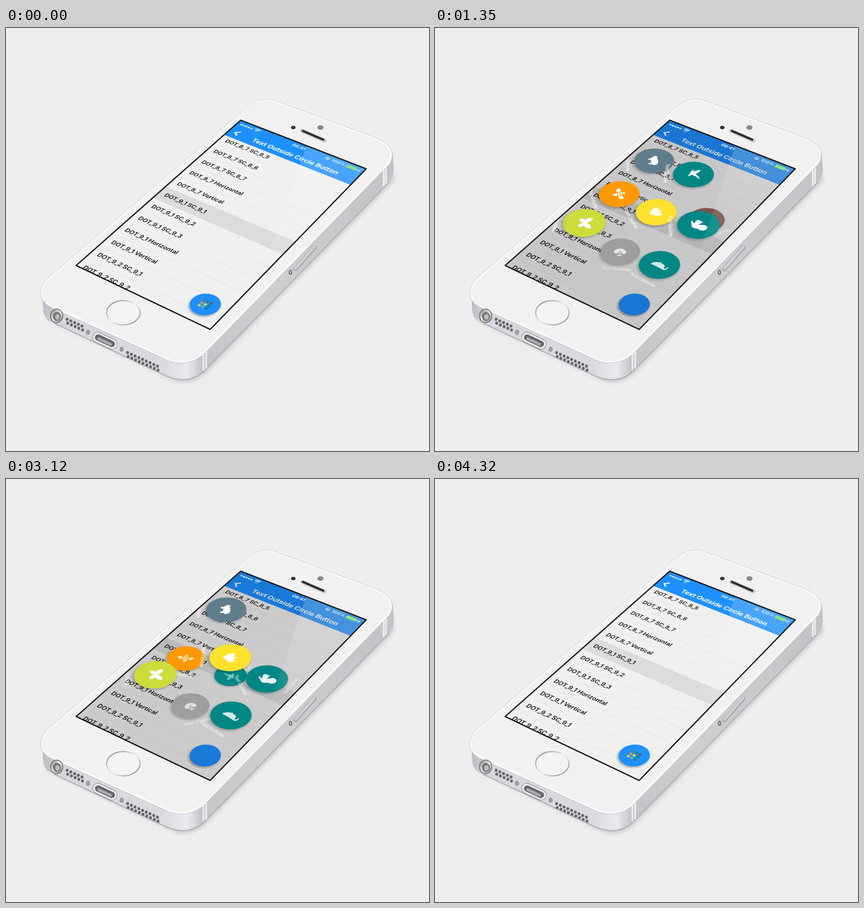
An HTML page that plays this animation: 748 by 748 pixels, repeating every 4350 ms.

```html
<!DOCTYPE html>
<html lang="en">
<head>
<meta charset="utf-8">
<title>Circle button menu</title>
<style>
html, body { margin: 0; width: 100%; height: 100%; overflow: hidden; background: #eee; }
svg { position: absolute; left: 0; top: 0; }
text { font-family: Inter, Roboto, sans-serif; }
/* Lays the flat 320 x 568 display onto the tilted phone. */
#screen {
  transform-origin: 0 0;
  transform: matrix3d(.5987, .2316, 0, -.00014925, -.53827, .36454, 0, -.00020933, 0, 0, 1, 0, 415, 163, 0, 1);
}
</style>
</head>
<body>
<svg id="phone" width="748" height="748">
  <defs>
    <linearGradient id="right" x1="0" y1="1" x2="1" y2="0">
      <stop offset="0" stop-color="#d2d2d6"/><stop offset=".1" stop-color="#bdbdc1"/>
      <stop offset=".5" stop-color="#cfcfd2"/><stop offset="1" stop-color="#c2c2c6"/>
    </linearGradient>
    <linearGradient id="base">
      <stop offset="0" stop-color="#bcbcc2"/><stop offset=".12" stop-color="#d6d6dc"/>
      <stop offset=".75" stop-color="#dadae0"/><stop offset=".9" stop-color="#e9e9ef"/>
      <stop offset="1" stop-color="#bebec4"/>
    </linearGradient>
    <linearGradient id="metal" x2="1" y2="1">
      <stop offset="0" stop-color="#777"/><stop offset=".5" stop-color="#eee"/><stop offset="1" stop-color="#777"/>
    </linearGradient>
    <filter id="soft"><feGaussianBlur stdDeviation="4"/></filter>
  </defs>
  <path d="M74 514L300 623Q330 630 354 607L684 270L686 256L340 580L80 490Z" fill="#999" opacity=".6" filter="url(#soft)"/>
  <path d="M64 466L66 500Q67 515 85 522L285 616Q326 632 353 604L677 273Q686 263 686 248L684 222L352 560L300 585Z" fill="url(#right)"/>
  <path d="M64 466L66 500Q67 515 85 522L285 616Q322 630 350 606L350 572L300 585Z" fill="url(#base)"/>
  <path d="M85 522L285 616Q326 632 353 604L677 273" fill="none" stroke="#aaaab0" stroke-width="1.5"/>
  <path d="M428 140Q444 124 470 127L655 196Q692 212 677 239L352 572Q328 597 292 588L80 492Q50 476 72 446Z" fill="#f1f1f1" stroke="#fafafa" stroke-width="3"/>
  <path d="M428 139Q444 123 470 126L656 195Q694 212 679 240L353 574Q328 599 291 590L79 494Q48 476 71 445Z" fill="none" stroke="#c2c2c6" stroke-width=".8"/>
  <path d="M349 576V606M354 572V602M668 251V280M672 247V276" stroke="#ececf1" stroke-width="3"/>
  <path d="M512 426L545 388" stroke="#a5a5a9" stroke-width="8" stroke-linecap="round"/>
  <path d="M512 425L545 387" stroke="#cfcfd3" stroke-width="5" stroke-linecap="round"/>
  <ellipse cx="503" cy="432" rx="3" ry="4.5" fill="#777"/><ellipse cx="503" cy="432" rx="1" ry="2" fill="#ddd"/>
  <ellipse cx="89.500" cy="509" rx="11" ry="12" fill="url(#metal)" stroke="#77777c" stroke-width="1.500"/>
  <ellipse cx="90" cy="510" rx="7" ry="8" fill="#777"/><ellipse cx="91" cy="511" rx="4" ry="5" fill="#bbb"/>
  <g transform="translate(175 553) rotate(25)">
    <rect x="-23" y="-9" width="46" height="18" rx="9" fill="#eee" stroke="#8b8b90"/>
    <rect x="-19" y="-5.500" width="38" height="11" rx="5.500" fill="#66666b"/>
    <rect x="-14" y="-1" width="28" height="5" rx="2" fill="#a9a9ae"/>
  </g>
  <g fill="#a2a2a7" stroke="#85858a"><ellipse cx="145" cy="538" rx="3" ry="4"/><ellipse cx="204.500" cy="568" rx="3" ry="4"/></g>
  <g id="holes" fill="#66666c"></g>
  <ellipse cx="207.500" cy="503.500" rx="29.500" ry="21.500" fill="#f3f3f3" stroke="url(#metal)" stroke-width="2"/>
  <path d="M524 182L563 199" stroke="#c9c9c9" stroke-width="7" stroke-linecap="round"/>
  <path d="M525 182L561 197.500" stroke="#2c2c2c" stroke-width="4" stroke-linecap="round"/>
  <ellipse cx="508" cy="176" rx="4" ry="3" fill="#333"/>
  <ellipse cx="556" cy="176" rx="5.500" ry="4" fill="#88888e"/>
</svg>

<svg id="screen" width="320" height="568" viewBox="0 0 320 568">
  <defs>
    <radialGradient id="shade">
      <stop offset=".75" stop-color="#000" stop-opacity=".35"/><stop offset="1" stop-color="#000" stop-opacity="0"/>
    </radialGradient>
  </defs>
  <rect width="320" height="568" fill="#f0f0f0"/>
  <g id="rows"></g>
  <rect width="320" height="64" fill="#1e90ff"/>
  <path d="M25 36L16 44L25 52" fill="none" stroke="#fff" stroke-width="3.500"/>
  <text x="170" y="51" font-size="17" font-weight="700" fill="#fff" text-anchor="middle">Text Outside Circle Button</text>
  <circle cx="274" cy="523" r="33" fill="url(#shade)"/>
  <circle cx="274" cy="519" r="29.500" fill="#1e90ff"/>
  <rect id="dim" width="320" height="568"/>
  <g id="status" fill="#fff">
    <path d="M45 10q7-6 14 0M47.500 13q4.500-4 9 0" fill="none" stroke="#fff" stroke-width="1.800"/>
    <path d="M49.500 15.500h5l-2.500 3z"/>
    <text x="160" y="17" font-size="12" font-weight="600" text-anchor="middle">09:41</text>
    <circle cx="233" cy="13" r="4.500" fill="none" stroke="#fff"/><rect x="231" y="12" width="4" height="3"/>
    <text x="260" y="17" font-size="12" font-weight="500" text-anchor="middle">100%</text>
    <rect x="279" y="8" width="24" height="10" rx="2" fill="#6fdc62"/><rect x="304" y="11" width="2" height="4"/>
    <path d="M311 8l-4 6h3l-1 5 4-6h-3z"/>
  </g>
  <g id="menu"></g>
</svg>

<svg width="748" height="748">
  <defs>
    <linearGradient id="sheen" x1=".8" y1="0" x2=".2" y2="1">
      <stop offset="0" stop-color="#fff" stop-opacity=".22"/><stop offset="1" stop-color="#fff" stop-opacity=".06"/>
    </linearGradient>
  </defs>
  <path d="M531 208L637 249L482 409L466 401Z" fill="url(#sheen)"/>
  <path d="M415 163L637 249L361 533L124 420Z" fill="none" stroke="#151515" stroke-width="2.200" stroke-linejoin="round"/>
</svg>

<script>
const LOOP = 4350, DURATION = 1000, STEP = 50, SHOW = 540, HIDE = 2440;
const SPAN = DURATION + 8 * STEP;
const FAB = [274, 519];
const $ = id => document.getElementById(id);
const clamp = v => Math.max(0, Math.min(1, v));
const mix = (a, b, k) => a + (b - a) * k;

function add(parent, tag, attrs, content = '') {
  const el = document.createElementNS('http://www.w3.org/2000/svg', tag);
  for (const key in attrs) el.setAttribute(key, attrs[key]);
  el.textContent = content;
  return parent.appendChild(el);
}

// Speaker and microphone holes: x, y, columns.
for (const [x, y, cols] of [[108, 515, 5], [215, 574, 9]])
  for (let i = 0; i < cols * 2; i++) {
    const col = i >> 1, row = i % 2;
    add($('holes'), 'ellipse', { cx: x + col * 6.6 + row, cy: y + col * 3 + row * 7, rx: 2.5, ry: 2.8 });
  }

for (let i = 0; i < 5; i++) add($('status'), 'circle', { cx: 11 + i * 6.5, cy: 13, r: 2.4 });

const labels = ['8_7 SC_8_5', '8_7 SC_8_6', '8_7 SC_8_7', '8_7 Horizontal', '8_7 Vertical', '9_1 SC_9_1',
  '9_1 SC_9_2', '9_1 SC_9_3', '9_1 Horizontal', '9_1 Vertical', '9_2 SC_9_1', '9_2 SC_9_2'];
labels.forEach((label, i) => {
  const y = 79 + 44 * i;
  if (i === 5) add($('rows'), 'rect', { y: y - 22, width: 320, height: 44, fill: '#dcdcdc' });
  add($('rows'), 'rect', { x: 15, y: y + 21.5, width: 305, height: .8, fill: '#dcdcdf' });
  add($('rows'), 'text', { x: 15, y: y + 5, 'font-size': 14.3, 'font-weight': 600, fill: '#111' }, 'DOT_' + label);
});

// Colour, place in the show order, place in the hide order, icon.
const buttons = [
  ['#607d8b', 4, 7, 'M-16-3l3-5 4 2q9-4 19-1 5 4 4 9l-3 1v8h-4l-1-5h-9l-1 5h-4l-1-6q-4-1-7-8z'],
  ['#008785', 2, 0, 'M-15-13q9 2 13 9 6-8 17-9-5 3-6 6l-3 1q-1 6-5 8l6 9-10-4q-8-1-12-7l7 1q-5-5-7-14z'],
  ['#795548', 8, 1, 'M-17-3q5-4 10-2l4 2 1-4 2 2 2-2 1 4 4-2q5-2 10 2-4 1-5 5-3-1-5 1-3 0-7 5-4-5-7-5-2-2-5-1-1-4-5-5z'],
  ['#ff9800', 0, 3, 'M-4-8a4 4 0 1 1 8 0zM-5-6h10v3h-10zM-6-1h12v3h-12zM-5 4h10q-2 7-5 9-3-2-5-9zM-7-4q-10-5-10 2 2 7 10 5zM7-4q10-5 10 2-2 7-10 5z'],
  ['#ffe12e', 5, 8, 'M-12-9q5 4 9 2l3-6 3 6q4 2 9-2 3 10-3 15l-9 9-9-9q-6-5-3-15z'],
  ['#008785', 1, 5, 'M-14 2q-1-6 5-8l2-4 2 4q4 2 3 7 3-3 3-8 0-9 8-9 8 1 8 9 0 6-6 9-1 10-8 11h-14l-1-3h6l-1-5h-5l-1-2h4z'],
  ['#cddc39', 3, 6, 'M0-4q5-11 15-10 2 9-7 14 5 3 4 9-6 5-12-6-6 11-12 6-1-6 4-9-9-5-7-14 10-1 15 10z'],
  ['#9e9e9e', 7, 2, 'M-13 4a13 13 0 1 1 26 0q-4 4-9 2l-3-8h-2l-3 8q-5 2-9-2zM-1 0h2v10h4v3h-10v-3h4z'],
  ['#008785', 6, 4, 'M-16 5q4-9 11-10 2-4 5-1 12-1 12 8 4 4 5-6h2q1 14-9 11h-18q-8 2-8-2z']
].map(([color, show, hide, icon], i) => {
  const col = i % 3 - 1, row = (i / 3 | 0) - 1;
  const group = add($('menu'), 'g', {});
  const shadow = add(group, 'circle', { r: 45, fill: 'url(#shade)' });
  const body = add(group, 'g', {});
  add(body, 'circle', { r: 40, fill: color });
  const face = add(body, 'g', { fill: '#fff' });
  add(face, 'path', { d: icon });
  add(face, 'text', { y: 56, 'font-size': 10.2, 'font-weight': 500, 'text-anchor': 'middle' }, 'Text Outside');
  return {
    group, shadow, body, face, show, hide,
    from: [FAB[0] + col * 8, FAB[1] + row * 8],
    to: [160 + col * 91, 296 + row * 107.5]
  };
});

// Fast start with a gentle overshoot, sampled at even steps.
const CURVE = [0, .38, .61, .775, .905, .995, 1.07, 1.085, 1.062, 1.02, 1];
function ease(p) {
  const i = Math.min(9, Math.floor(p * 10)), k = p * 10 - i;
  const a = CURVE[i], b = CURVE[i + 1];
  const before = CURVE[i - 1] ?? -.4, after = CURVE[i + 2] ?? 1;
  const m = (b - before) / 2, n = (after - a) / 2;
  return a + k * (m + k * (3 * (b - a) - 2 * m - n + k * (2 * (a - b) + m + n)));
}

function draw(time) {
  const hiding = time >= HIDE;
  const progress = (delay, length) => hiding
    ? 1 - clamp((time - HIDE - delay) / length)
    : clamp((time - SHOW - delay) / length);

  $('dim').setAttribute('opacity', .3 * progress(0, SPAN));
  for (const b of buttons) {
    const p = progress(STEP * (hiding ? b.hide : b.show), DURATION);
    const e = ease(p);
    const x = mix(b.from[0], b.to[0], e), y = mix(b.from[1], b.to[1], e * e);
    b.group.setAttribute('transform', `translate(${x} ${y}) scale(${mix(.075, 1, e)})`);
    b.shadow.setAttribute('transform', `translate(0 ${4 * clamp(e)})`);
    b.shadow.setAttribute('opacity', p > 0 ? .8 : 0);
    b.body.setAttribute('transform', `rotate(${720 * e})`);
    b.face.setAttribute('opacity', clamp(p * 1.6));
  }
}

const start = performance.now();
function tick() {
  draw((performance.now() - start) % LOOP);
  requestAnimationFrame(tick);
}
tick();
</script>
</body>
</html>
```
